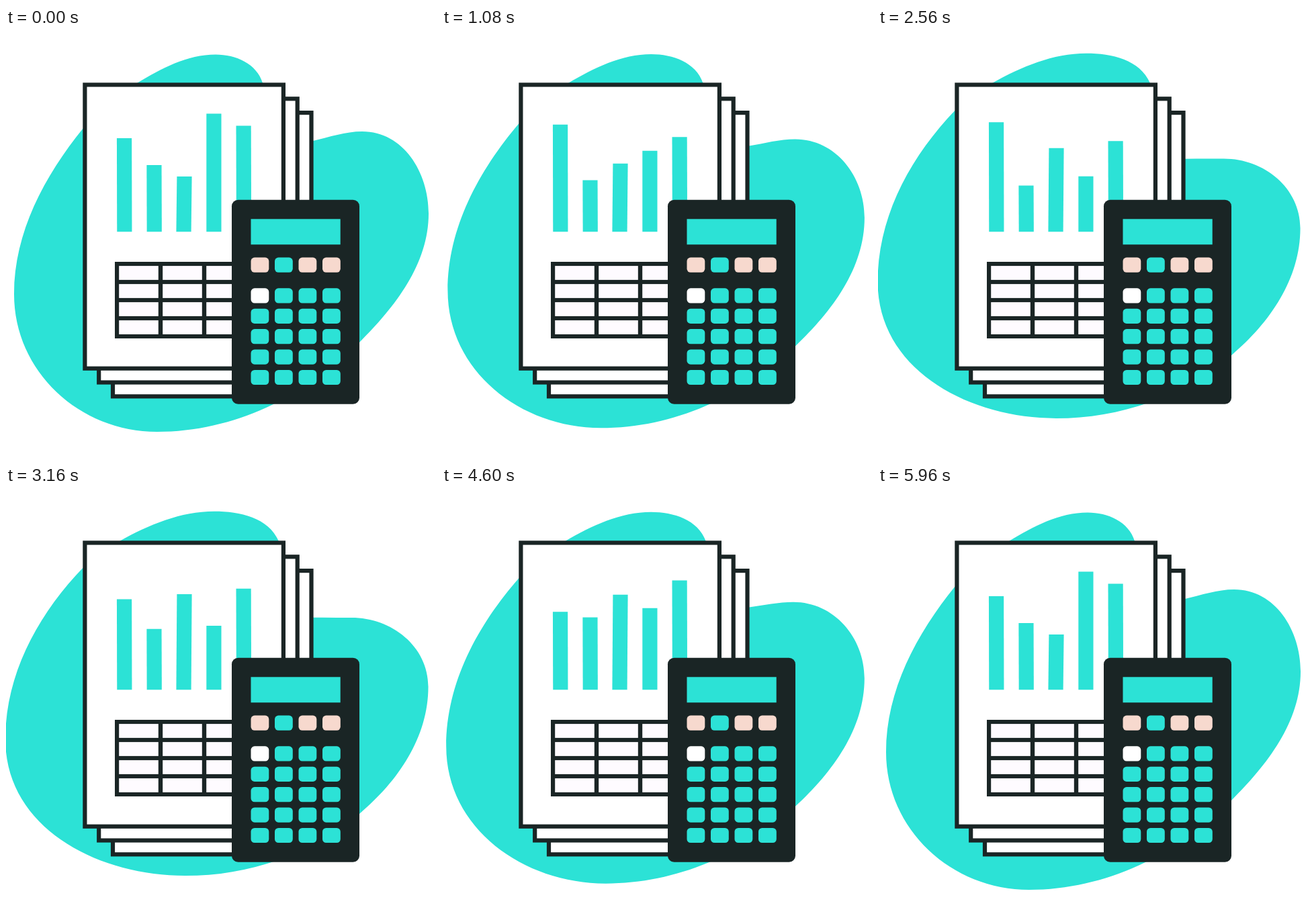
Animation, 640 px wide and 640 px high, one loop 6 s. Source, as an HTML page with a canvas:

```html
<!DOCTYPE html>
<html lang="en">
<head>
<meta charset="utf-8">
<title>Accounting</title>
<style>
html, body { margin: 0; width: 100%; height: 100%; overflow: hidden; background: #fff; }
canvas { display: block; width: 640px; height: 640px; }
</style>
</head>
<body>
<canvas id="stage" width="640" height="640"></canvas>
<script>
const ctx = document.getElementById('stage').getContext('2d');
const LOOP = 6000, STEP = 40;
const TEAL = '#2ce2d6', DARK = '#1a2525', PINK = '#f7d9ce', WHITE = '#fff';

const lerp = (a, b, p) => a + (b - a) * p;
const smooth = u => u * u * (3 - 2 * u);

// cubic-bezier(.42, 0, .58, 1), solved by bisection
function easeInOut(x) {
  let lo = 0, hi = 1;
  for (let i = 0; i < 24; i++) {
    const s = (lo + hi) / 2, r = 1 - s;
    const v = 1.26 * r * r * s + 1.74 * r * s * s + s * s * s;
    if (v < x) lo = s; else hi = s;
  }
  return smooth(lo);
}

// Clockwise knots of the two blob poses: x, y, heading in degrees
const tall = [
  [312, 39.5, 0], [382, 82, 73], [457, 168, -13], [530, 154, 0], [629, 276, 90],
  [526, 468, 135], [225, 601, 180], [12, 396, 270], [115, 149, 309], [195, 82, 329]
];
const wide = [
  [310, 37.8, 0], [406, 82, 66], [457, 196, -1], [514, 196.3, 0], [628.5, 299, 90],
  [526, 488, 140], [267, 580, 180], [-1, 377, 270], [115, 121, 314], [169, 82, 331]
];

// Height of each bar's top at three evenly spaced keys
const barTops = [
  [164, 127.8, 193.5],
  [204, 244.2, 193.3],
  [221, 186.8, 145.3],
  [127.5, 226.4, 196.7],
  [145.5, 175.2, 139.1]
];
const barLean = [-0.3, -0.3, 1, 0, -0.4];
const BAR_W = 22.2, BAR_GAP = 44.4, BASE = 303.2;

function rect(x, y, w, h, color) {
  ctx.fillStyle = color;
  ctx.fillRect(x, y, w, h);
}

function roundRect(x, y, w, h, r, color) {
  ctx.fillStyle = color;
  ctx.beginPath();
  ctx.moveTo(x + r, y);
  ctx.arcTo(x + w, y, x + w, y + h, r);
  ctx.arcTo(x + w, y + h, x, y + h, r);
  ctx.arcTo(x, y + h, x, y, r);
  ctx.arcTo(x, y, x + w, y, r);
  ctx.fill();
}

// Joins two knots with handles as long as those of a circular arc
function arcBetween([x0, y0, h0], [x1, y1, h1]) {
  const a = h0 * Math.PI / 180, b = h1 * Math.PI / 180;
  const k = Math.hypot(x1 - x0, y1 - y0) * 2 / (3 + 3 * Math.abs(Math.cos((b - a) / 2)));
  ctx.bezierCurveTo(
    x0 + k * Math.cos(a), y0 + k * Math.sin(a),
    x1 - k * Math.cos(b), y1 - k * Math.sin(b), x1, y1);
}

function drawBlob(t) {
  const half = LOOP / 2;
  const p = easeInOut(1 - Math.abs(t - half) / half);
  const knots = tall.map((knot, i) => knot.map((v, j) => lerp(v, wide[i][j], p)));
  const [x, y, heading] = knots[0];
  knots.push([x, y, heading + 360]);
  ctx.fillStyle = TEAL;
  ctx.beginPath();
  ctx.moveTo(x, y);
  for (let i = 1; i < knots.length; i++) arcBetween(knots[i - 1], knots[i]);
  ctx.fill();
}

function drawPapers() {
  for (let i = 2; i >= 0; i--) {
    const d = i * 20.8;
    rect(114.3 + d, 81.4 + d, 301.7, 428.4, DARK);
    rect(120.5 + d, 87.6 + d, 289.3, 416, WHITE);
  }
}

function drawBars(t) {
  const span = LOOP / 3, k = Math.floor(t / span);
  const p = smooth(t / span - k);
  ctx.fillStyle = TEAL;
  barTops.forEach((tops, i) => {
    const x = 165.1 + i * BAR_GAP, lean = barLean[i] / 2;
    const y = lerp(tops[k], tops[(k + 1) % 3], p);
    ctx.beginPath();
    ctx.moveTo(x + lean, y);
    ctx.lineTo(x + lean + BAR_W, y);
    ctx.lineTo(x - lean + BAR_W, BASE);
    ctx.lineTo(x - lean, BASE);
    ctx.fill();
  });
}

function drawTable() {
  rect(162, 348, 200, 114, DARK);
  for (let row = 0; row < 4; row++)
    for (let col = 0; col < 3; col++)
      rect(168.2 + col * 65, 354.1 + row * 27, 58.6, 20.8, '#fefbff');
}

function drawCalculator() {
  roundRect(336, 255.7, 190, 304, 9.5, DARK);
  rect(364.5, 284.3, 133.2, 38, TEAL);
  for (let col = 0; col < 4; col++) {
    const x = 364.5 + col * 35.5;
    roundRect(x, 341.6, 26.8, 22.2, 5.5, col === 1 ? TEAL : PINK);
    for (let row = 0; row < 5; row++)
      roundRect(x, 387.3 + row * 30.4, 26.8, 22.2, 5.5, row + col ? TEAL : WHITE);
  }
}

const start = performance.now();
function frame(now) {
  const t = Math.floor((Math.max(0, now - start) % LOOP) / STEP) * STEP;
  rect(0, 0, 640, 640, WHITE);
  drawBlob(t);
  drawPapers();
  drawBars(t);
  drawTable();
  drawCalculator();
  requestAnimationFrame(frame);
}
frame(start);
</script>
</body>
</html>
```
